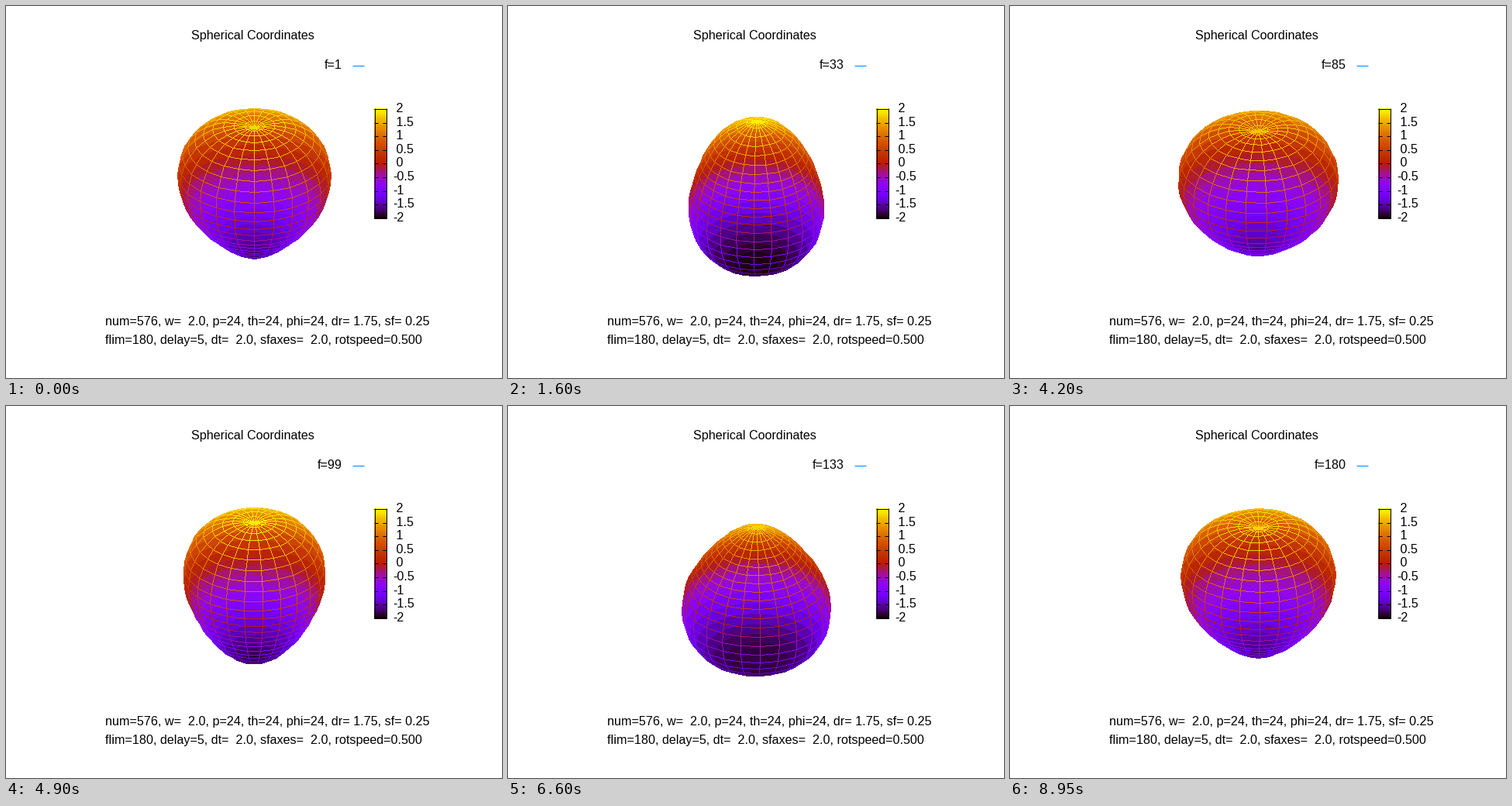
A matplotlib script that plays this animation: 640x480 px, repeating every 9000 ms.

```python
import numpy as np
import matplotlib.pyplot as plt
from matplotlib.animation import FuncAnimation
from matplotlib.collections import PolyCollection

plt.rcParams.update({
    "font.family": "Liberation Sans",
    "text.hinting": "force_autohint",
    "text.hinting_factor": 8,
    "text.kerning_factor": 6,
    "toolbar": "None",
})

W, H, DPI = 640, 480, 64
PX = 72 / DPI                      # one pixel in points
FRAMES, INTERVAL = 180, 50
N = 24                             # steps in both angles
RADIUS, SWING, ZMAX = 1.75, 0.25, 2.0
SCALE, CX, CY = 54.6, 320.5, 240.3
TILT = np.radians(60)
LEFT, TOP, SIDE = 200, 120, 240    # square that holds the wire grid

theta = np.linspace(0, np.pi, N + 1)
phi = np.arange(N + 1) * 2 * np.pi / N


def palette(z):
    """Black - violet - red - yellow ramp over [-ZMAX, ZMAX]."""
    g = np.clip((np.asarray(z, float) + ZMAX) / (2 * ZMAX), 0, 1)
    blue = np.clip(np.sin(2 * np.pi * g), 0, 1)
    return np.stack([np.sqrt(g), g ** 3, blue], axis=-1)


def project(k):
    """Screen points and heights of the mesh at step k."""
    t = np.radians(2 * k)
    r = RADIUS + SWING * np.sin(2 * theta + 2 * t)
    rho, z = r * np.sin(theta), r * np.cos(theta)
    turn = phi - t / 2
    x = np.outer(rho, np.sin(turn))
    depth = np.outer(rho, -np.cos(turn))
    z = np.repeat(z[:, None], N + 1, axis=1)
    up = z * np.sin(TILT) + depth * np.cos(TILT)
    return np.stack([CX + SCALE * x, CY - SCALE * up], axis=-1), z


def corners(a):
    return a[:-1, :-1], a[:-1, 1:], a[1:, 1:], a[1:, :-1]


def front_facing(quads):
    p, q, r, s = np.moveaxis(quads, 2, 0)
    d, e = r - p, s - q
    return d[..., 0] * e[..., 1] - d[..., 1] * e[..., 0] > 0


def edges(a, b, za, zb, seen):
    return np.stack([a, b], axis=-2)[seen], ((za + zb) / 2)[seen]


def mesh(k):
    p, z = project(k)
    quads = np.stack(corners(p), axis=2)
    front = front_facing(quads)
    far = quads[~front], (sum(corners(z)) / 4)[~front]

    pad = np.zeros((1, N), bool)
    ring_seen = np.vstack([pad, front]) | np.vstack([front, pad])
    rings = edges(p[:, :-1], p[:, 1:], z[:, :-1], z[:, 1:], ring_seen)
    side_seen = front | np.roll(front, 1, axis=1)
    sides = edges(p[:-1, :-1], p[1:, :-1], z[:-1, :-1], z[1:, :-1], side_seen)
    near = [np.concatenate(pair) for pair in zip(rings, sides)]
    return far, near


def trace(lines, z):
    """Lines one pixel wide, without smoothing, as an RGBA layer."""
    a, b = np.moveaxis(np.floor(lines), 1, 0)
    d = b - a
    length = np.abs(d).max(axis=1)
    step = np.arange(length.max() + 1)
    t = step / np.maximum(length, 1)[:, None]
    dots = np.floor(a[:, None] + d[:, None] * t[..., None] + .5).astype(int)
    keep = step <= length[:, None]
    x, y = (dots[keep] - (LEFT, TOP)).T
    rgb = np.repeat(palette(z)[:, None], len(step), axis=1)[keep]
    layer = np.zeros((SIDE, SIDE, 4), np.uint8)
    layer[y, x, :3] = np.rint(255 * rgb)
    layer[y, x, 3] = 255
    return layer


fig = plt.figure(figsize=(W / DPI, H / DPI), dpi=DPI, facecolor="white")
ax = fig.add_axes([0, 0, 1, 1])


def label(x, y, s, ha="left"):
    return ax.text(x, y, s, ha=ha, va="baseline", fontsize=16.13 * PX,
                   color="black")


def stroke(xs, ys, color="black"):
    ax.plot(xs, ys, color=color, lw=PX, solid_capstyle="butt", snap=True)


def picture(data, left, right, bottom, top, z):
    return ax.imshow(data, extent=(left, right, bottom, top), aspect="auto",
                     interpolation="nearest", zorder=z)


# colour bar
L, R, T, B = 475, 491, 132, 273
ramp = palette(np.linspace(ZMAX, -ZMAX, 128))[:, None, :]
picture(ramp, L, R, B + 1, T, 0)
for i in range(9):
    value = ZMAX - i / 2
    y = round(T + i * (B - T) / 8)
    stroke([L, L + 5], [y + .5] * 2)
    stroke([R - 5, R], [y + .5] * 2)
    label(499, y + 5, f"{value: g}")
for x in (L + .5, R - .5):
    stroke([x, x], [T, B + 1])
for y in (T + .5, B + .5):
    stroke([L, R], [y, y])

label(239, 43, "Spherical Coordinates")
label(128, 412, "num=576, w=  2.0, p=24, th=24, phi=24, dr= 1.75, sf= 0.25")
label(128, 436, "flim=180, delay=5, dt=  2.0, sfaxes=  2.0, rotspeed=0.500")
counter = label(434, 81, "f=1", ha="right")
stroke([447, 462], [76.5, 76.5], "#0080ff")

skin = PolyCollection([], linewidths=0, antialiaseds=False, zorder=3)
ax.add_collection(skin, autolim=False)
grid = picture(np.zeros((SIDE, SIDE, 4), np.uint8),
               LEFT, LEFT + SIDE, TOP + SIDE, TOP, 4)
ax.set_xlim(0, W)
ax.set_ylim(H, 0)
ax.axis("off")


def draw(k):
    (quads, quad_z), (lines, line_z) = mesh(k)
    skin.set_verts(np.floor(quads) + .5)
    skin.set_facecolor(palette(quad_z))
    grid.set_data(trace(lines, line_z))
    counter.set_text(f"f={k + 1}")
    return skin, grid, counter


anim = FuncAnimation(fig, draw, frames=FRAMES, interval=INTERVAL,
                     init_func=lambda: draw(0), repeat=True, repeat_delay=0)
plt.show()
```
